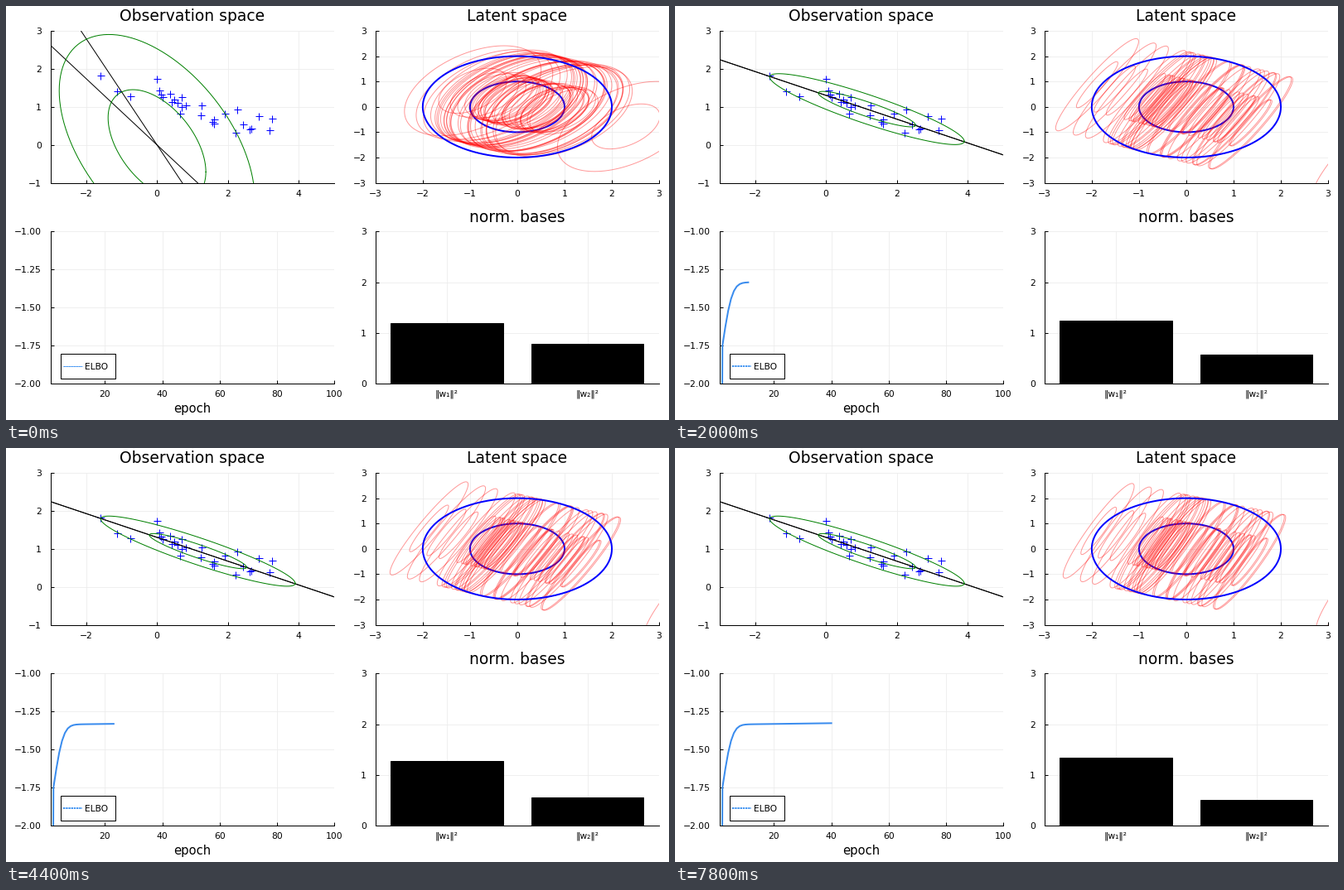
A matplotlib script for the animation above (8 s loop, 800x500 px).

```python
import numpy as np
import matplotlib.pyplot as plt
from matplotlib.animation import FuncAnimation
from matplotlib.collections import LineCollection

W, H, DPI = 800, 500, 100
EPOCHS, INTERVAL = 40, 200
PX = 72 / DPI  # points per pixel

plt.rcParams["font.family"] = "DejaVu Sans"
plt.rcParams["axes.unicode_minus"] = True

DATA = np.array([
    (-1.59, 1.82), (-1.12, 1.42), (-0.75, 1.28), (0, 1.735), (0.07, 1.43),
    (0.11, 1.32), (0.16, 1.255), (0.37, 1.355), (0.42, 1.125), (0.49, 1.19),
    (0.57, 1.10), (0.69, 1.255), (0.69, 0.995), (0.65, 0.82), (0.81, 1.04),
    (1.26, 1.04), (1.23, 0.775), (1.565, 0.60), (1.62, 0.665), (1.62, 0.56),
    (1.905, 0.83), (2.255, 0.92), (2.21, 0.33), (2.43, 0.545), (2.605, 0.415),
    (2.65, 0.44), (2.86, 0.755), (3.18, 0.375), (3.235, 0.70), (6.35, -0.70),
])

KEYS = [1, 2, 7, 11, 19, 27, 34, 40]
NORM1 = [1.194, 1.17, 1.21, 1.235, 1.268, 1.295, 1.32, 1.336]
NORM2 = [0.778, 0.62, 0.575, 0.572, 0.56, 0.548, 0.53, 0.512]

PHI = np.linspace(0, 2 * np.pi, 121)
CIRCLE = np.stack([np.cos(PHI), np.sin(PHI)])


def model(epoch):
    """Mean, basis matrix, noise variance and marginal covariance."""
    norms = np.interp(epoch, KEYS, NORM1), np.interp(epoch, KEYS, NORM2)
    fade = 0.2 ** (epoch - 1)
    angles = np.radians(17.4 + np.array([23.7, 37.06]) * fade)
    basis = np.array([np.cos(angles), -np.sin(angles)]) * norms * [1, -1]
    if epoch == 1:
        cov = np.array([[1.90, -0.982], [-0.982, 2.108]])
        return np.zeros(2), basis, 1.0, cov
    noise = 0.031 + 0.13 * np.exp(-0.36 * (epoch - 2))
    gain = (2.062 - noise) / np.sum(basis ** 2)
    cov = gain * basis @ basis.T + noise * np.eye(2)
    return np.array([1.156, 0.94]), basis, noise, cov


def elbo(epoch):
    x = epoch - 2
    value = -1.3345 - 0.4155 * np.exp(-0.3 * x - 0.05 * x ** 2)
    return np.where(epoch < 2, -6, value + 0.00025 * np.maximum(epoch - 8, 0))


def contour(cov, radius):
    return radius * np.linalg.cholesky(cov) @ CIRCLE


def panel(left, top, xlim, ylim, xticks, yticks, xlabels=None, fmt="{:g}"):
    ax = fig.add_axes([left / W, 1 - (top + 183.6) / H, 342.3 / W, 183.6 / H])
    ax.set_xlim(*xlim)
    ax.set_ylim(*ylim)
    ylabels = [fmt.format(v).replace("-", "\u2212") for v in yticks]
    xlabels = xlabels or [f"{v:g}".replace("-", "\u2212") for v in xticks]
    ax.set_xticks(xticks, xlabels)
    ax.set_yticks(yticks, ylabels)
    ax.tick_params(direction="in", length=4 * PX, width=PX, labelsize=10.7 * PX)
    ax.tick_params(axis="x", pad=8 * PX)
    ax.tick_params(axis="y", pad=11 * PX)
    ax.grid(color="#ececec", lw=0.8 * PX)
    ax.set_axisbelow(True)
    for side, spine in ax.spines.items():
        spine.set_visible(side in ("left", "bottom"))
        spine.set_linewidth(PX)
    return ax


def label(x, baseline, text, size, ha="center"):
    fig.text(x / W, 1 - baseline / H, text, fontsize=size * PX, ha=ha,
             va="baseline", zorder=20)


fig = plt.figure(figsize=(W / DPI, H / DPI), dpi=DPI, facecolor="white")

obs = panel(53.8, 30, (-3, 5), (-1, 3), range(-2, 5, 2), range(-1, 4))
lat = panel(445.8, 30, (-3, 3), (-3, 3), range(-3, 4), range(-3, 4))
curve = panel(53.8, 272.4, (1, 100), (-2, -1), range(20, 101, 20),
              np.linspace(-2, -1, 5), fmt="{:.2f}")
bars = panel(445.8, 272.4, (0.491, 2.51), (0, 3), [1, 2], range(4),
             xlabels=["\u2016w\u2081\u2016\u00b2", "\u2016w\u2082\u2016\u00b2"])

label(225, 18, "Observation space", 18.75)
label(616.5, 18, "Latent space", 18.75)
label(616.5, 261, "norm. bases", 18.75)
label(225, 491, "epoch", 14.7)

# observation space
obs.plot(*DATA.T, "+", color="blue", ms=9 * PX, mew=PX, zorder=3)
axes_lines = [obs.plot([], [], color="black", lw=PX, zorder=4)[0] for _ in range(2)]
rings = [obs.plot([], [], color="green", lw=PX, zorder=5)[0] for _ in range(2)]

# latent space: prior rings and one pair of contours per point
for radius, z in ((1, 2), (2, 4)):
    lat.plot(*(radius * CIRCLE), color="blue", lw=2 * PX, zorder=z)
posterior = LineCollection([], colors="red", alpha=0.4, linewidths=PX, zorder=3)
lat.add_collection(posterior, autolim=False)

# ELBO curve and its legend
BLUE = "#3a8cee"
trace, = curve.plot([], [], color=BLUE, lw=2 * PX, zorder=3)
curve.add_patch(plt.Rectangle((65.5, H - 450), 66, 30.5, fc="white", ec="black",
                              lw=PX, transform=None, zorder=8))
sample, = curve.plot([69, 91.5], [H - 435, H - 435], color="#1e80f0",
                     ls=(0, (1.5, 0.5)), transform=None, zorder=9)
label(94.5, 439, "ELBO", 10.7, ha="left")

blocks = bars.bar([1, 2], [1, 1], width=0.8, color="black", ec="black", lw=PX,
                  zorder=3)


def draw(frame):
    epoch = frame + 1
    mean, basis, noise, cov = model(epoch)

    for line, w in zip(axes_lines, basis.T):
        ends = mean[:, None] + np.outer(w, [-15, 15])
        line.set_data(*ends)
    for radius, ring in enumerate(rings, 1):
        ring.set_data(*(mean[:, None] + contour(cov, radius)))

    inv = np.linalg.inv(basis.T @ basis + noise * np.eye(2))
    centres = (DATA - mean) @ basis @ inv
    shapes = [contour(noise * inv, r).T for r in (1, 2)]
    posterior.set_segments([c + s for c in centres for s in shapes])

    steps = np.arange(1, epoch + 1)
    trace.set_data(steps, elbo(steps))
    sample.set_linewidth((1 if epoch == 1 else 1.6) * PX)

    for block, w in zip(blocks, basis.T):
        block.set_height(np.linalg.norm(w))
    return [*axes_lines, *rings, posterior, trace, sample, *blocks]


anim = FuncAnimation(fig, draw, frames=EPOCHS, interval=INTERVAL,
                     init_func=lambda: draw(0), repeat=True, repeat_delay=0)
plt.show()
```
